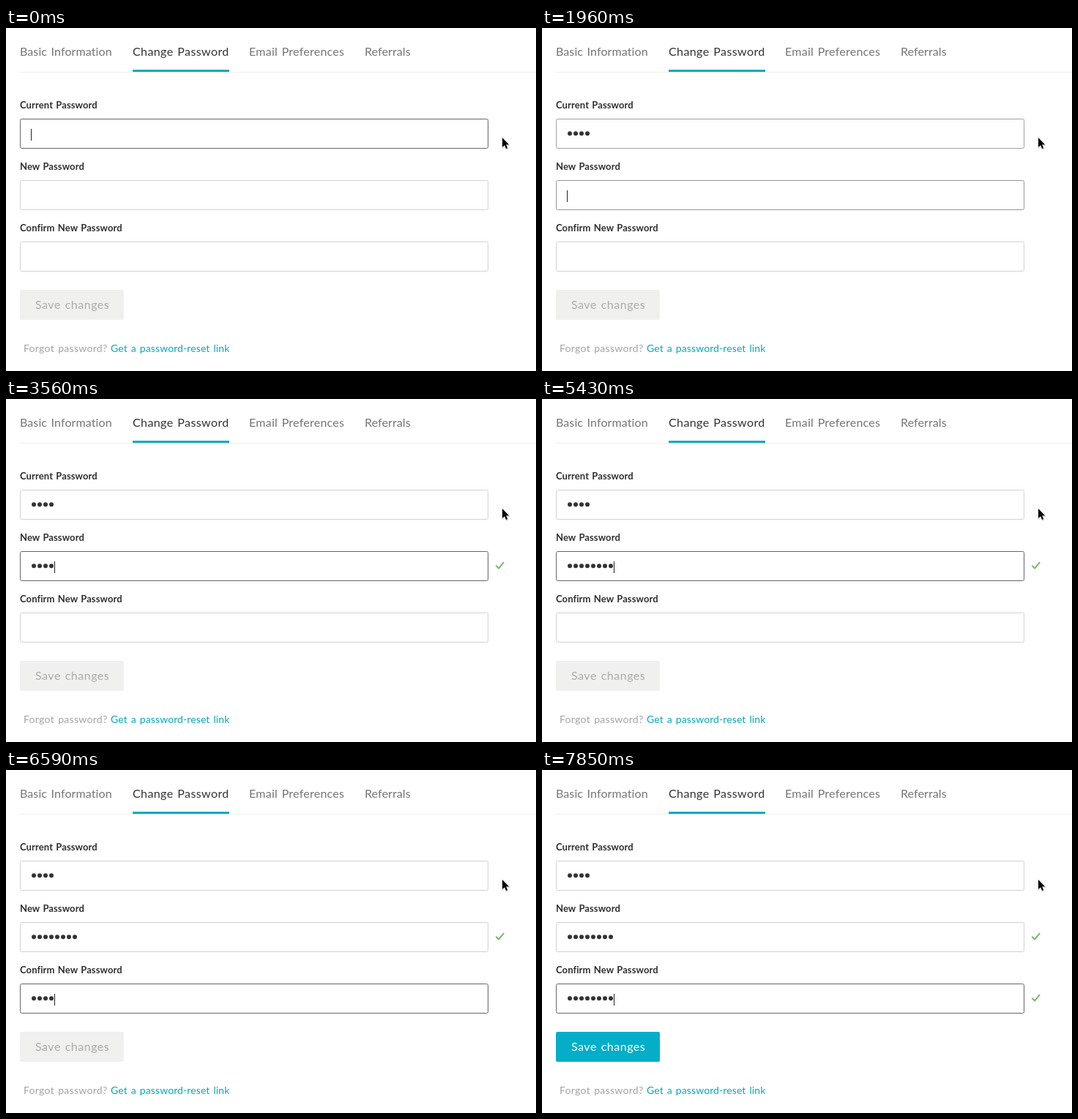
Animation of 724x469 px, one loop 8000 ms. Source, as an HTML page:

```html
<!DOCTYPE html>
<html lang="en">
<head>
<meta charset="utf-8">
<title>Change password</title>
<style>
  html, body { margin: 0; width: 100%; height: 100%; overflow: hidden; background: #fff; }
  svg { display: block; width: 724px; height: 469px; }
  text { font: 16px Lato, "Open Sans", sans-serif; word-spacing: 1.3px; white-space: pre; }
  .tab { fill: #757575; }
  .active { fill: #333; }
  .label { font-size: 13px; font-weight: 700; fill: #2f2f2f; letter-spacing: .1px; word-spacing: 1px; }
  .note { font-size: 13px; fill: #a6a6a6; letter-spacing: .3px; }
  .small { font-size: 14px; fill: #a3a3a3; letter-spacing: .3px; }
  .link { fill: #03a9bd; letter-spacing: .1px; }
</style>
</head>
<body>
<svg id="stage" viewBox="0 0 724 469" xmlns="http://www.w3.org/2000/svg"></svg>
<script>
const LOOP = 8000;
const stage = document.getElementById('stage');

function add(tag, attrs, content = '') {
  const node = document.createElementNS('http://www.w3.org/2000/svg', tag);
  for (const key in attrs) node.setAttribute(key, attrs[key]);
  node.textContent = content;
  return stage.appendChild(node);
}

function write(content, x, y, cls, spacing) {
  const node = add('text', { x, y, class: cls }, content);
  if (spacing) node.style.letterSpacing = spacing + 'px';
  return node;
}

const show = (node, on) => node.setAttribute('visibility', on ? 'visible' : 'hidden');
const within = (t, spans) => spans.some(([from, to]) => t >= from && t < to);

// Tabs
add('rect', { x: 19, y: 60, width: 705, height: 1, fill: '#efefed' });
add('rect', { x: 173, y: 57, width: 132, height: 3, fill: '#0aabc0' });
write('Basic Information', 19, 38, 'tab', 0.1);
write('Change Password', 173, 38, 'active', 0.4);
write('Email Preferences', 332, 38, 'tab', 0.25);
write('Referrals', 490, 38, 'tab', 0.1);

// Fields: key press times, span of the "(Required)" note, time the check mark appears
const fields = [
  { label: 'Current Password', top: 124, keys: [1070, 1160, 1250, 1430] },
  { label: 'New Password', top: 208, keys: [3030, 3300, 3390, 3560, 3920, 4190, 4280, 4450],
    noteX: 116, note: [2050, 3030], valid: 3030 },
  { label: 'Confirm New Password', top: 292, keys: [6140, 6320, 6410, 6590, 7310, 7580, 7670, 7850],
    noteX: 168, note: [5700, 6140], valid: 7850 }
];

for (const f of fields) {
  write(f.label, 19, f.top - 14, 'label');
  f.box = add('rect', { x: 19.5, y: f.top + 0.5, width: 639, height: 40, rx: 2, fill: '#fff' });
  f.dots = f.keys.map((_, i) =>
    add('circle', { cx: 38 + 8 * i, cy: f.top + 20.2, r: 3, fill: '#333' }));
  if (f.note) {
    f.noteText = write('(Required)', f.noteX, f.top - 14, 'note');
    f.check = add('path', {
      d: `M669.3 ${f.top + 19.8}l3.8 3.7 7-8.3`,
      fill: 'none', stroke: '#7cb66f', 'stroke-width': 2
    });
  }
}

const caret = add('rect', { width: 1, height: 16, fill: '#222' });
const button = add('rect', { x: 19, y: 358, width: 142, height: 41, rx: 2 });
const buttonText = write('Save changes', 40, 384, '', 0.5);
write('Forgot password?', 24, 443, 'small');
write('Get a password-reset link', 143, 443, 'small link');

// Mouse pointer
const arrow = 'M678 150v13l3-2.8 2.1 4.9 2.1-.9-2.1-4.8h4.1z';
add('path', { d: arrow, transform: 'translate(.4 1)', fill: '#bbb', stroke: '#ddd', 'stroke-width': 1.6 });
add('path', { d: arrow, fill: '#000', stroke: '#fff', 'stroke-width': 1, 'paint-order': 'stroke' });

const caretOff = [[260, 800], [2410, 2940], [4990, 5430], [6060, 6140], [7040, 7310]];
// [time, field, how far the focus border has faded in]
const focusSteps = [[0, 0, 1], [1870, 1, 0.2], [1960, 1, 0.55], [2050, 1, 1], [5610, 2, 0.5], [5700, 2, 1]];

function borderColor(amount) {
  const v = Math.round(210 - 108 * amount);
  return `rgb(${v},${v},${v})`;
}

function draw(t) {
  const [, current, fade] = focusSteps.filter(step => step[0] <= t).pop();

  fields.forEach((f, i) => {
    const amount = i === current ? fade : i === current - 1 ? 1 - fade : 0;
    f.box.setAttribute('stroke', borderColor(amount));
    f.dots.forEach((dot, k) => show(dot, t >= f.keys[k]));
    if (f.note) {
      show(f.noteText, within(t, [f.note]));
      show(f.check, t >= f.valid);
    }
  });

  const field = fields[current];
  const typed = field.keys.filter(time => time <= t).length;
  caret.setAttribute('x', 34 + 8 * typed);
  caret.setAttribute('y', field.top + 14);
  show(caret, !within(t, caretOff));

  const ready = t >= fields[2].valid;
  button.setAttribute('fill', ready ? '#04aec8' : '#f0f0ef');
  buttonText.setAttribute('fill', ready ? '#fff' : '#acacac');
}

function tick() {
  draw(performance.now() % LOOP);
  requestAnimationFrame(tick);
}
tick();
</script>
</body>
</html>
```
